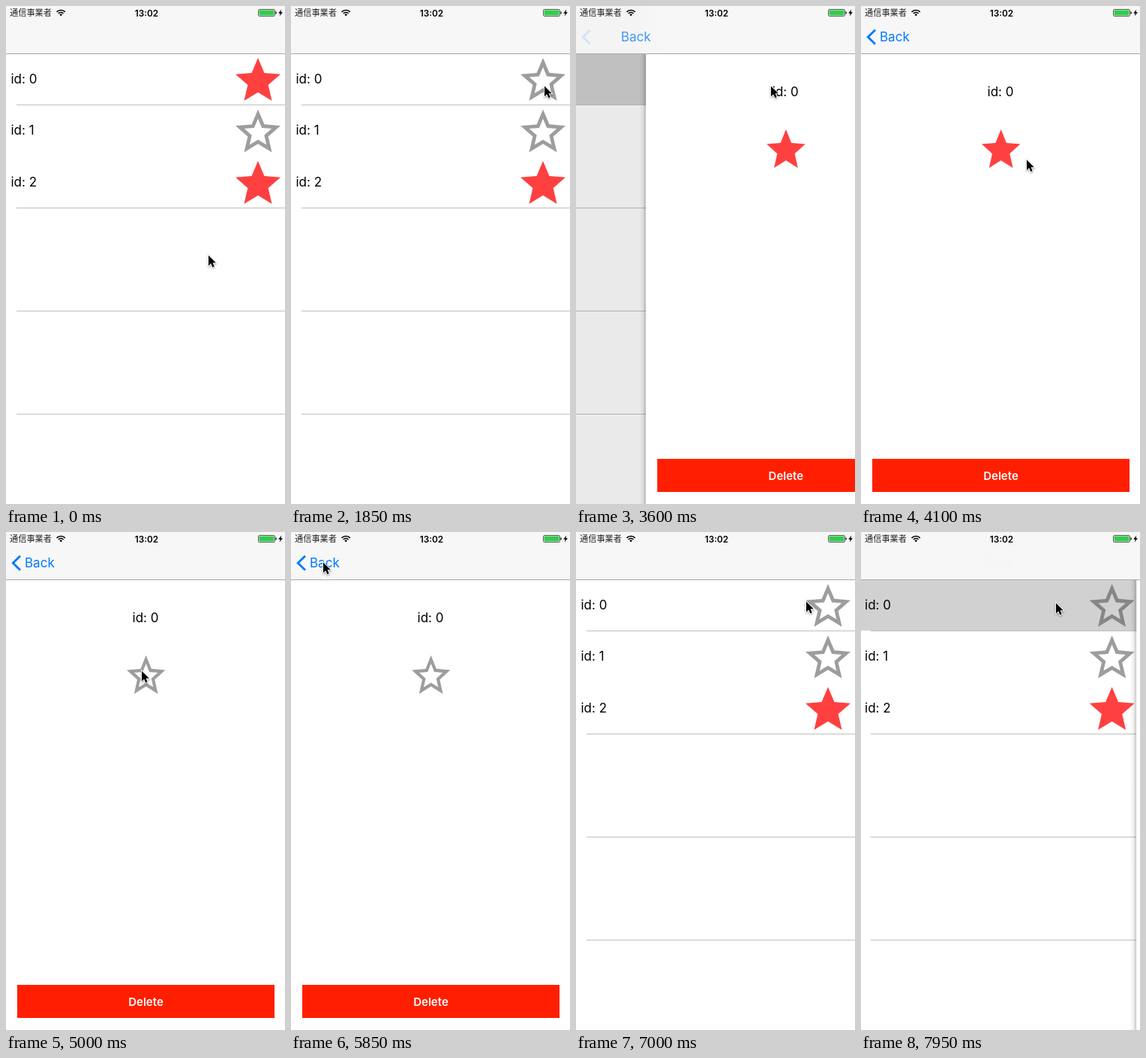
Animation, 372 px wide and 662 px high, one loop 8 s. Source, as an HTML page:

```html
<!DOCTYPE html>
<html lang="ja">
<head>
<meta charset="utf-8">
<title>Favorites list</title>
<style>
  html, body { margin: 0; width: 100%; height: 100%; overflow: hidden; background: #fff; }
  svg { display: block; width: 372px; height: 662px; }
  text { font-family: Inter, Roboto, sans-serif; font-size: 17px; white-space: pre; }
  .cjk { font-family: "Noto Sans CJK JP", "Noto Sans CJK", sans-serif; font-size: 11.2px; fill: #222; }
  .on { fill: #ff4040; }
  .off { fill: rgba(60, 60, 60, .5); }
</style>
</head>
<body>
<svg viewBox="0 0 372 662" xmlns="http://www.w3.org/2000/svg">
  <defs>
    <path id="full" d="M12 17.27L18.18 21l-1.64-7.03L22 9.24l-7.19-.61L12 2 9.19 8.63 2 9.24l5.46 4.73L5.82 21z"/>
    <path id="hollow" d="M22 9.24l-7.19-.62L12 2 9.19 8.63 2 9.24l5.46 4.73L5.82 21 12 17.27 18.18 21l-1.63-7.03L22 9.24zM12 15.4l-3.76 2.27 1-4.28-3.32-2.88 4.38-.38L12 6.1l1.71 4.04 4.38.38-3.32 2.88 1 4.28L12 15.4z"/>
    <linearGradient id="edge">
      <stop offset="0" stop-color="#000" stop-opacity="0"/>
      <stop offset=".5" stop-color="#000" stop-opacity=".05"/>
      <stop offset="1" stop-color="#000" stop-opacity=".22"/>
    </linearGradient>
    <linearGradient id="tint">
      <stop offset=".6" stop-color="#000" stop-opacity=".018"/>
      <stop offset="1" stop-color="#000" stop-opacity="0"/>
    </linearGradient>
  </defs>

  <rect width="372" height="662" fill="#fff"/>
  <g id="list">
    <rect id="pressed" y="63" width="372" height="68" fill="#d1d1d1"/>
    <g id="rows"></g>
  </g>
  <rect id="dim" y="63" width="372" height="599"/>

  <g id="page">
    <rect x="-9" y="63" width="9" height="599" fill="url(#edge)"/>
    <rect y="63" width="372" height="599" fill="#fff"/>
    <text x="186" y="119.5" text-anchor="middle">id: 0</text>
    <g transform="translate(155.8 158.6) scale(2.57 2.7)">
      <use href="#full" class="on fav"/>
      <use href="#hollow" class="off unfav"/>
    </g>
    <rect x="15" y="602" width="343" height="44" fill="#ff1f00"/>
    <text x="186.5" y="630" text-anchor="middle" fill="#fff" style="font-size:15px;font-weight:600">Delete</text>
  </g>

  <rect width="372" height="63" fill="#f7f7f7"/>
  <rect id="shade" height="63" fill="url(#tint)"/>
  <rect y="63" width="372" height="1" fill="#a9a9a9"/>
  <path id="chevron" d="M19 31.8L9.3 41.3L19 50.8" fill="none" stroke="#007aff" stroke-width="2.9"/>
  <text id="back" x="25" y="47" fill="#007aff">Back</text>

  <text class="cjk" x="5" y="13.4">通信事業者</text>
  <g fill="none" stroke="#000" stroke-width="1.7">
    <path d="M67.6 7.8A8 8 0 0 1 78.8 7.8"/>
    <path d="M69.8 10A4.9 4.9 0 0 1 76.6 10"/>
  </g>
  <path d="M71.4 11.4A2.6 2.6 0 0 1 75 11.4L73.2 13.4Z"/>
  <text x="187.5" y="13.5" text-anchor="middle" style="font-size:11.8px;font-weight:600">13:02</text>
  <rect x="336.5" y="4.5" width="22" height="9" rx="1.6" fill="#fff" stroke="#333" stroke-width=".8"/>
  <rect x="337.5" y="5.5" width="20" height="7" rx=".7" fill="#35cb4f"/>
  <path d="M359.4 7.2a1.8 1.8 0 0 1 0 3.6z" fill="#333"/>
  <path d="M367.3 4.6L363.2 9.7H365.7L364.7 13.6L369 8.3H366.4Z"/>

  <g id="cursor" style="filter:drop-shadow(0 1px 1px rgba(0,0,0,.4))">
    <path d="M0 .5V14.2L3.2 11.2L5.4 16.2L7.7 15.2L5.6 10.3H9.8Z" stroke="#fff" stroke-width="1.8" paint-order="stroke"/>
  </g>
</svg>
<script>
const LOOP = 8000, TICK = 50, WIDTH = 372;
const $ = id => document.getElementById(id);
const clamp = v => Math.min(1, Math.max(0, v));

const separator = y => `<rect x="14" y="${y}" width="358" height="1" fill="#c0c0c0"/>`;
const star = (shape, cls) => `<use href="#${shape}" class="${cls}"/>`;
const full = star("full", "on"), hollow = star("hollow", "off");
const toggling = star("full", "on fav") + star("hollow", "off unfav");

$("rows").innerHTML = [toggling, hollow, full].map((icon, i) => `
  <text x="6.5" y="${Math.floor(103 + 68.5 * i)}">id: ${i}</text>
  <g transform="translate(300 ${63 + 68.5 * i}) scale(3)">${icon}</g>`).join("")
  + [131, 268, 405, 542].map(separator).join("");

// Pointer stops: time, x, y
const stops = [
  [200, 270, 331], [850, 338, 106], [2650, 338, 106], [3000, 260, 106],
  [3600, 260, 106], [4100, 221, 204], [4250, 200, 203], [4300, 197, 201],
  [4850, 197, 201], [5600, 43, 40], [6450, 43, 40], [6950, 309, 93],
  [7000, 307, 92], [7100, 303, 93], [7300, 303, 93], [7700, 260, 94]
];

function pointer(t) {
  const i = stops.findIndex(s => s[0] > t);
  if (i < 1) return stops[i ? stops.length - 1 : 0].slice(1);
  const [t0, x0, y0] = stops[i - 1], [t1, x1, y1] = stops[i];
  const u = (t - t0) / (t1 - t0), e = u * u * (3 - 2 * u);
  return [x0 + (x1 - x0) * e, y0 + (y1 - y0) * e];
}

// Critically damped spring from 0 to 1
function spring(ms) {
  if (ms <= 0) return 0;
  const x = ms * .0168, v = 1 - (1 + x) * Math.exp(-x);
  return v > .997 ? 1 : v;
}

const PUSH = 3440, POP = 6140, PUSH_AGAIN = 7940;
const fade = (t, start) => clamp((t - start) / 150);

function draw(t) {
  const p = spring(t - PUSH) - spring(t - POP) + spring(t - PUSH_AGAIN);
  const fav = 1 - fade(t, 1450) + fade(t, 2400) - fade(t, 4400);
  const x = WIDTH * (1 - p);
  const [cx, cy] = pointer(t);
  const set = (id, name, value) => $(id).setAttribute(name, value);

  set("list", "transform", `translate(${-.3 * WIDTH * p} 0)`);
  set("pressed", "opacity", t < PUSH ? 0 : t < POP || t >= PUSH_AGAIN ? 1 : p);
  set("dim", "opacity", .11 * p);
  set("page", "transform", `translate(${x} 0)`);
  set("page", "visibility", p > 0 ? "visible" : "hidden");
  set("shade", "width", x + 25);
  set("shade", "opacity", p * clamp(4 * (1 - p)));
  set("chevron", "opacity", p ** 7);
  set("back", "opacity", p);
  set("back", "transform", `translate(${140 * (1 - p)} 0)`);
  set("cursor", "transform", `translate(${cx} ${cy})`);
  document.querySelectorAll(".fav").forEach(n => n.setAttribute("opacity", fav));
  document.querySelectorAll(".unfav").forEach(n => n.setAttribute("opacity", 1 - fav));
}

const start = performance.now();
function frame(now) {
  const t = Math.max(0, now - start) % LOOP;
  draw(Math.floor(t / TICK) * TICK);
  requestAnimationFrame(frame);
}
draw(0);
requestAnimationFrame(frame);
</script>
</body>
</html>
```
